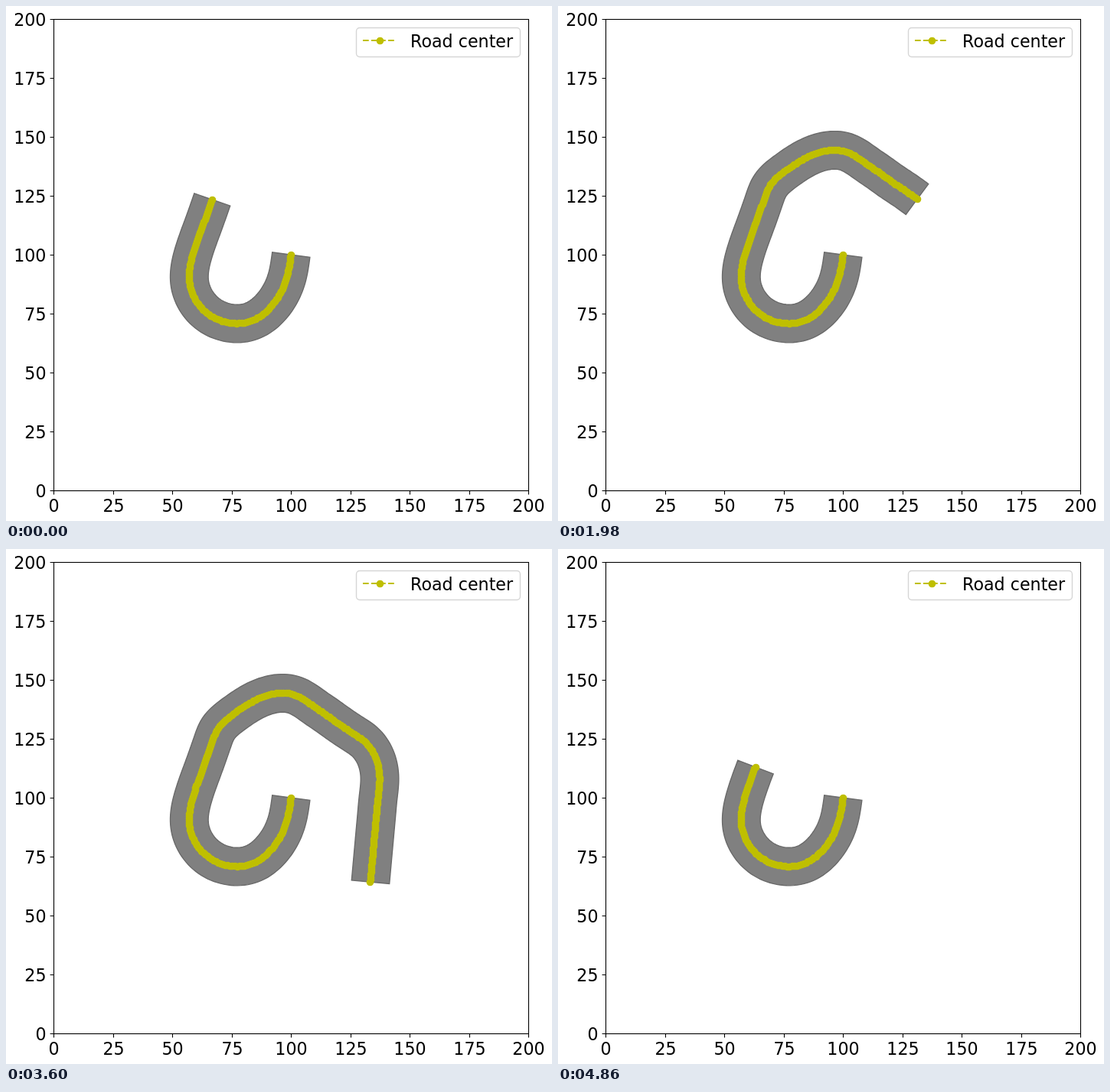
Recreate the animation shown at these times as an HTML page. Size 713 by 673 pixels, loop 5040 ms.

```html
<!DOCTYPE html>
<html lang="en">
<head>
<meta charset="utf-8">
<title>Road growth</title>
<style>
  html, body { margin: 0; width: 100%; height: 100%; overflow: hidden; background: #fff; }
  svg { display: block; width: 713px; height: 673px; }
  text { font: 22.2px "DejaVu Sans", sans-serif; fill: #000; }
  .frame { fill: none; stroke: #000; stroke-width: 1.1; }
  .road { fill: #808080; stroke: #696969; stroke-width: 1.39; stroke-linejoin: miter; }
  .dots { fill: none; stroke: #bfbf00; stroke-width: 9.7; stroke-linecap: round; }
  .dash { stroke: #bfbf00; stroke-width: 2.08; stroke-dasharray: 7.7 3.33; }
</style>
</head>
<body>
<svg viewBox="0 0 713 673">
  <path class="road" id="road"/>
  <path class="dots" id="dots"/>
  <g id="axes">
    <rect class="frame" x="62.5" y="17.5" width="620" height="616"/>
  </g>
  <rect x="457.5" y="28.5" width="214" height="38" rx="4.4" fill="#fff" stroke="#ccc" stroke-width="1.39" opacity=".8"/>
  <path class="dash" d="M466 45H510"/>
  <path class="dots" d="M488.5 45.5h0"/>
  <text x="528" y="54">Road center</text>
</svg>
<script>
const LOOP = 5040, STEP = 180, HALF_WIDTH = 24.8, DOT_GAP = 3.1;
const byId = id => document.getElementById(id);

// Road states in driving order; the last stretch is straight.
const knots = [
  [372.3, 325], [366, 358], [349, 390], [320, 412], [266, 404], [240, 363],
  [245, 322], [258, 285], [269.3, 253], [277, 235], [297, 216], [319, 201.3],
  [343, 191], [374, 190], [405, 208], [418.2, 217], [435, 229], [453, 241],
  [469, 252.5], [482, 271], [488, 298], [485.7, 327.5]
];
for (let i = 1; i <= 6; i++) knots.push([485.7 - 1.62 * i, 327.5 + 17.95 * i]);

// Second derivatives of a natural cubic spline.
function curvature(t, v) {
  const n = t.length, c = [0], d = [0], m = Array(n).fill(0);
  for (let i = 1; i < n - 1; i++) {
    const a = t[i] - t[i - 1], b = t[i + 1] - t[i];
    const rhs = 6 * ((v[i + 1] - v[i]) / b - (v[i] - v[i - 1]) / a);
    const w = 2 * (a + b) - a * c[i - 1];
    c[i] = b / w;
    d[i] = (rhs - a * d[i - 1]) / w;
  }
  for (let i = n - 2; i > 0; i--) m[i] = d[i] - c[i] * m[i + 1];
  return m;
}

// Returns s -> [value, slope].
function spline(t, v) {
  const m = curvature(t, v);
  return s => {
    let i = 0;
    while (i < t.length - 2 && s > t[i + 1]) i++;
    const h = t[i + 1] - t[i], a = (t[i + 1] - s) / h, b = 1 - a;
    return [
      a * v[i] + b * v[i + 1] + ((a ** 3 - a) * m[i] + (b ** 3 - b) * m[i + 1]) * h * h / 6,
      (v[i + 1] - v[i]) / h + ((1 - 3 * a * a) * m[i] + (3 * b * b - 1) * m[i + 1]) * h / 6
    ];
  };
}

function buildRoad(last) {
  const pts = knots.slice(0, last + 1), t = [0];
  for (let i = 1; i < pts.length; i++) {
    t.push(t[i - 1] + Math.hypot(pts[i][0] - pts[i - 1][0], pts[i][1] - pts[i - 1][1]));
  }
  const fx = spline(t, pts.map(p => p[0])), fy = spline(t, pts.map(p => p[1]));
  const count = Math.round(t[last] / DOT_GAP), left = [], right = [];
  let dots = "";
  for (let i = 0; i <= count; i++) {
    const s = t[last] * i / count, [x, dx] = fx(s), [y, dy] = fy(s);
    const k = HALF_WIDTH / Math.hypot(dx, dy), nx = dy * k, ny = -dx * k;
    left.push(`${(x + nx).toFixed(2)} ${(y + ny).toFixed(2)}`);
    right.unshift(`${(x - nx).toFixed(2)} ${(y - ny).toFixed(2)}`);
    // Markers sit on whole pixels.
    dots += `M${Math.floor(x) + .5} ${Math.floor(y) + .5}h0`;
  }
  return { edge: "M" + left.concat(right).join("L") + "Z", dots };
}

function drawAxes() {
  let ticks = "", labels = "";
  for (let v = 0; v <= 200; v += 25) {
    const x = Math.round(62 + 3.1 * v) + .5, y = Math.round(633 - 3.08 * v) + .5;
    ticks += `M${x} 633.5v4.9M62.5 ${y}h-4.9`;
    labels += `<text x="${x}" y="660.5" text-anchor="middle">${v}</text>` +
      `<text x="52.5" y="${y + 8}" text-anchor="end">${v}</text>`;
  }
  byId("axes").innerHTML += `<path class="frame" d="${ticks}"/>` + labels;
}

drawAxes();
const roads = knots.map((_, i) => i ? buildRoad(i) : null);
let shown = 0;

function draw() {
  const slot = Math.floor(performance.now() % LOOP / STEP);
  const step = Math.max(0, slot - 1);
  const last = step < 20 ? step + 8 : step - 19;
  if (last !== shown) {
    byId("road").setAttribute("d", roads[last].edge);
    byId("dots").setAttribute("d", roads[last].dots);
    shown = last;
  }
  requestAnimationFrame(draw);
}
draw();
</script>
</body>
</html>
```
